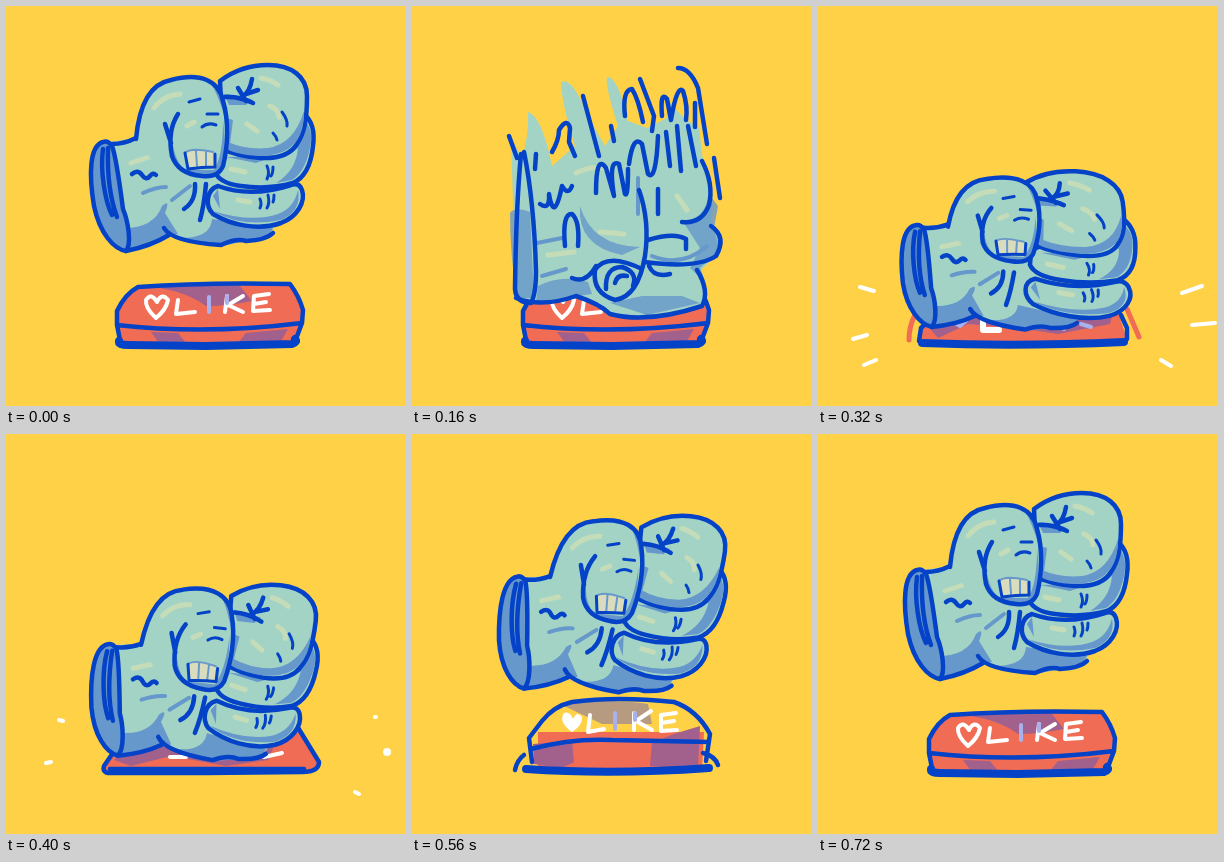
Animation of 400x400 px, one loop 960 ms. Source, as an HTML page:

```html
<!DOCTYPE html>
<html lang="en">
<head>
<meta charset="utf-8">
<title>Like button smash</title>
<style>
  html, body { margin: 0; width: 100%; height: 100%; overflow: hidden; background: #ffd147 }
  svg { display: block; width: 400px; height: 400px }
  path { fill: none; stroke-linecap: round; stroke-linejoin: round; vector-effect: non-scaling-stroke }
  .line { stroke: #0443c8; stroke-width: 4.5 }
  .thin { stroke: #0443c8; stroke-width: 3 }
  .bold { stroke: #0443c8; stroke-width: 8 }
  .skin { fill: #a3d3c4 }
  .shade { fill: #6798cb }
  .crease { stroke: #6798cb; stroke-width: 4 }
  .glow { stroke: #c5dcb9; stroke-width: 5 }
  .red { fill: #f06c54 }
  .redline { stroke: #f06c54; stroke-width: 5 }
  .plum { fill: #a2608c }
  .ink { stroke: #fff; stroke-width: 4 }
  .lilac { stroke: #a9b0ee; stroke-width: 4 }
  .white { fill: #fff }
  .scene { display: none }
</style>
</head>
<body>
<svg viewBox="0 0 400 400">
  <g class="scene" id="rest">
    <path class="red" d="M111 318V305Q119 288 132 281Q200 277 284 278Q293 290 297 304L290 335Q200 342 115 335Z"/>
    <path class="plum" d="M146 281Q190 277 234 280L246 295Q222 300 200 300Q180 285 146 281ZM145 326L172 327 180 337 153 337ZM240 327L282 323 275 335 232 337Z"/>
    <path class="line" d="M111 319V305Q119 288 132 281Q200 276 284 278Q293 290 297 304L296 317Q200 329 111 319L114 334M296 317L290 333"/>
    <path class="bold" d="M113 335Q112 339 122 339L200 340 286 338Q292 336 289 333"/>
    <path class="ink" d="M150 312Q139 302 140 294Q145 286 151 296Q156 286 162 294Q160 304 150 312M172 294L170 308 189 306M221 290L219 306M237 290L222 299 237 306M263 288L248 290 247 305 264 304M248 298L260 296"/>
    <path class="lilac" d="M203 291V306M221 290V297"/>
  </g>

  <g class="scene" id="flat">
    <path class="redline" d="M91 334Q91 320 97 309M309 303L321 331"/>
    <path class="red" d="M101 336L103 322 118 306H300L310 336Z"/>
    <path class="plum" d="M108 318L124 306H295L292 318 240 328 200 322 150 318 120 332Z"/>
    <path class="ink" style="stroke-width:6" d="M165 312V324H181"/>
    <path class="lilac" d="M136 316l6 4 6-5M205 320h10M234 318l12 5M263 318l10 3"/>
    <path class="line" d="M101 335L103 322 118 308M303 309L309 322V333"/>
    <path class="bold" d="M104 337Q200 341 306 336"/>
  </g>

  <g class="scene" id="low">
    <path class="red" d="M97 334L115 304 291 292 313 328 306 338H100Z"/>
    <path class="plum" d="M108 326L116 318 160 310 270 308 262 326 220 332 165 322 125 332Z"/>
    <path class="ink" d="M164 323H180M258 323l18-4"/>
    <path class="line" d="M113 310L98 332Q96 339 104 339L200 339 296 338Q313 338 313 328L291 292"/>
    <path class="line" d="M104 335L298 335"/>
  </g>

  <g class="scene" id="mid">
    <path class="red" d="M98 337L116 303 200 294 292 298 314 340H110Z"/>
    <path class="plum" d="M112 328L130 302H270L262 318 200 328 158 318Z"/>
    <path class="lilac" style="fill:#a9b0ee" d="M136 308l9 14 10-15-9 4z"/>
    <path class="lilac" d="M168 307v17h18M228 308v13M253 310v12h17M255 316h14"/>
    <path class="line" d="M110 336L108 330 128 300Q200 290 285 296L303 328 299 337"/>
    <path class="bold" style="stroke-width:6" d="M110 337Q200 341 299 336"/>
  </g>

  <g class="scene" id="tall">
    <path class="red" d="M126 298H292L290 337H126Z"/>
    <path d="M150 271Q200 264 236 270L240 290H190Z" style="fill:#b79b80"/>
    <path class="plum" d="M121 310L160 307 162 328 150 334 122 330ZM240 309L262 300 288 292 286 334 238 332Z"/>
    <path class="ink" d="M178 281L176 298 192 295M222 279V296M239 277L224 287 240 296M264 279L249 281V297L265 296M249 289L262 287"/>
    <path class="lilac" d="M203 279V295M223 279V286"/>
    <path class="white" d="M160 298Q146 288 152 279Q158 277 161 285Q165 276 170 283Q171 291 160 298"/>
    <path class="line" d="M120 328L117 304 130 287Q142 272 160 268Q205 262 262 268Q285 276 298 300L294 327M119 315Q160 304 200 306L297 308M103 336Q105 326 112 321M291 319Q303 322 306 331"/>
    <path class="bold" d="M114 335Q200 341 297 334"/>
  </g>

  <g class="scene" id="smear">
    <path class="skin" d="M99 132L110 152Q117 130 116 106Q130 110 140 160L163 140Q149 95 149 76Q160 70 176 110L193 140 206 120Q193 80 195 71Q206 70 216 115L235 122 255 112 256 95 272 112 287 122 291 155Q304 175 299 215Q314 230 305 248L289 264Q298 285 290 300Q235 318 198 308L165 290Q130 302 104 292Z"/>
    <path class="shade" style="opacity:.8" d="M98 207Q103 200 118 206L122 292H105Q98 250 98 207M270 214Q292 216 297 188L306 200 302 222 308 245 288 262 293 276 278 262 288 242ZM126 280Q150 268 176 276L180 288 124 296ZM198 297L230 290 270 290 288 297 235 309ZM168 200Q180 240 228 241L210 249Q165 240 168 200"/>
    <path class="glow" d="M164 167Q185 157 200 165M188 226l24 2M136 249l26-3M265 190l10 14"/>
    <path class="crease" d="M125 237l25-5M130 270l24-7M226 172v36M240 250Q270 262 295 240"/>
    <path class="line" d="M97 130L105 152M109 148Q104 200 103 283Q104 297 119 297M112 146Q122 195 124 265Q124 288 119 297M124 148L123 163M140 146Q147 134 147 124Q155 111 158 122L157 136 163 150M128 198Q138 205 137 188Q142 218 150 180Q156 190 160 180M171 90L187 150M184 187Q184 147 194 162L202 190Q196 152 207 158L213 188Q216 192 216 163M199 120l3 15M213 110Q210 84 220 83Q226 92 231 116M228 73L242 110 240 125M250 110Q248 84 255 93L259 114Q265 78 271 85Q276 100 274 114M266 62Q278 62 286 82L295 138M283 97v24M217 158Q221 128 230 138L236 168Q244 176 246 130M254 126L258 160M265 120L269 165M276 120L284 160M153 240Q150 207 160 208Q168 215 166 240"/>
    <path class="line" d="M227 184Q238 215 233 250Q226 291 203 294Q180 287 183 264Q195 246 230 263M194 283Q193 261 210 261Q226 266 221 280M203 277Q205 268 215 270M160 272Q174 278 184 260M236 234Q262 226 274 233V243M246 183V208M290 155Q302 178 297 199Q290 218 270 216M302 152l6 40M299 220Q315 231 304 250Q285 263 232 256M237 260Q242 272 258 268M285 264Q298 285 290 300Q235 318 198 308Q188 298 164 290Q130 302 104 292"/>
  </g>

  <g id="hand">
    <g>
      <path class="skin" d="M97 137L130 132 160 100 225 150 240 180 268 222Q262 232 240 234L215 240Q185 238 163 230Q145 241 120 245Z"/>
      <path class="shade" d="M118 222Q148 222 156 200Q165 192 159 207L172 228 163 230Q145 241 120 245ZM172 232Q205 233 206 213L267 222 262 231 215 240Z"/>
      <path class="shade line" d="M97 136C83 140 83 170 88 200C94 228 108 243 120 245C126 238 122 215 117 203C114 180 110 150 106 140Q102 134 97 136Z"/>
      <path class="line" d="M97 143C94 165 99 195 106 209M102 142C101 172 105 195 111 211"/>
      <path class="line" d="M106 138Q118 138 130 132M120 245Q145 240 163 229M158 222Q166 236 215 239Q230 232 240 235Q260 234 267 227M126 168q6-5 10 1q4 6 8 1q3-4 6-1M178 203Q190 195 189 178M194 214Q198 200 200 178"/>
      <path class="crease" d="M137 187Q150 181 160 181M184 180L166 194"/>
      <path class="glow" d="M125 157L146 150"/>
    </g>
    <g>
      <path class="skin line" d="M212 180C200 184 199 200 207 208C225 219 252 225 275 217C291 211 300 196 296 184Q293 176 285 179Q245 192 212 180Z"/>
      <path class="shade" d="M207 205Q245 217 272 208Q288 202 292 184Q296 205 275 214Q235 222 207 205M207 190l5-7 2 20z"/>
      <path class="skin line" d="M298 108Q310 118 307 140C305 160 298 172 287 177Q262 184 235 180Q212 177 209 165L212 148Z"/>
      <path class="shade" d="M298 113Q308 124 304 142Q299 166 286 174L270 177Q290 165 292 142L250 157 220 151 255 150Q294 146 298 113"/>
      <path class="skin line" d="M214 75Q235 59 262 59C286 59 301 71 301 90C301 115 298 128 291 138Q282 153 255 152Q230 150 217 143Z"/>
      <path class="shade" d="M222 136Q240 144 262 142Q288 138 298 105Q299 149 255 150Q230 149 219 142ZM218 88L246 93 240 99 223 99ZM220 112l7 2-3 24-5 2z"/>
      <path class="glow" d="M255 72q10 2 17 7M264 100q9 4 9 11M241 118l10 7M225 163l14 3M232 194l12 2"/>
      <path class="line" d="M219 91Q232 90 247 97M236 91Q244 86 246 73M232 82L240 95M240 88L252 84"/>
      <path class="thin" d="M276 106Q282 114 281 120M267 127q3 3 4 7M261 160q3 7 0 13M267 161q0 6-2 9M254 193q2 5 0 9M262 189q2 8-1 13M268 189q0 5-1 7"/>
    </g>
    <g>
      <path class="skin" d="M130 133C133 100 143 78 165 74C195 66 213 75 217 95C222 115 221 140 216 160Q212 172 196 170Q170 168 165 145L150 160Z"/>
      <path class="shade" d="M165 120Q166 155 180 164L208 164Q217 150 217 115Q224 172 198 170Q160 170 165 120M203 74Q219 80 219 112Q212 88 203 74"/>
      <path class="line" d="M130 133C133 100 143 78 165 74C195 66 213 75 217 95C223 115 222 140 217 160Q212 172 196 170Q172 168 166 150Q161 125 172 108M159 118L165 137"/>
      <path class="glow" d="M148 102Q158 89 174 88M181 120l7-4"/>
      <path d="M179 146Q184 140 207 146L208 160 182 162Z" style="fill:#d9ddbd"/>
      <path class="crease" style="stroke-width:2" d="M190 145l1 15M200 146v14M179 147Q184 141 207 146"/>
      <path class="thin" d="M179 147L182 163Q196 161 209 161V148M183 96l11-3M201 108h11M196 121q6-5 14-2"/>
    </g>
  </g>

  <path class="ink" id="sparks"/>
</svg>
<script>
const STEP = 80, LOOP = 960;
const mix = (a, b, k) => a.map((v, i) => v + (b[i] - v) * k);

// Matrices for palm, fingers and thumb; a single one moves all three.
const squash = [[.97, .06, 0, .83, -1, 109.6], [1.22, 0, .36, .82, -100, 131], [1, 0, 0, .68, -5, 140]];
const settle = [.992, .11, -.119, 1, 21.9, 63.5];
const lift = [.963, .246, -.269, 1.119, 50.4, -1];
const rise = [.986, .103, -.145, 1.005, 29.2, -4];
const idle = [1, 0, 0, 1, 2, 0];

const burst = 'M55 288L80 298M48 323L79 310M55 351L77 342M322 299L369 285M327 321L382 317M321 346Q330 355 346 356';
const fade = 'M42 281l14 4M35 333l14-4M46 359l12-5M364 287l20-7M374 319l23-2M343 354l10 6';
const dots = 'M53 286l4 1M40 329l5-1M369 283h1M379 318a2 2 0 1 0 4 0a2 2 0 1 0-4 0M349 358l4 2';

const poses = [
  { hand: [[1, 0, 0, 1, 0, 0]], show: 'rest' },
  { hand: [[1, 0, 0, 1, -1, -9]], show: 'rest' },
  { show: 'rest smear' },
  { hand: squash, show: 'flat', sparks: burst },
  { hand: squash.map(m => mix(m, settle, .5)), show: 'flat', sparks: fade },
  { hand: [settle], show: 'low', sparks: dots },
  { hand: [lift], show: 'mid' },
  { hand: [rise], show: 'tall' },
  { hand: [mix(rise, idle, .6)], show: 'rest' },
  { hand: [idle], show: 'rest' }
];

const hand = document.getElementById('hand');
const sparks = document.getElementById('sparks');
const scenes = document.querySelectorAll('.scene');

function draw(now) {
  const index = Math.min(poses.length - 1, Math.floor(now % LOOP / STEP));
  const { hand: parts, show, sparks: rays = '' } = poses[index];
  const visible = show.split(' ');
  scenes.forEach(s => s.style.display = visible.includes(s.id) ? 'inline' : 'none');
  hand.style.display = parts ? 'inline' : 'none';
  if (parts) [...hand.children].forEach((part, i) =>
    part.setAttribute('transform', `matrix(${parts[i] || parts[0]})`));
  sparks.setAttribute('d', rays);
}

const start = performance.now();
(function tick() {
  draw(performance.now() - start);
  requestAnimationFrame(tick);
})();
</script>
</body>
</html>
```
